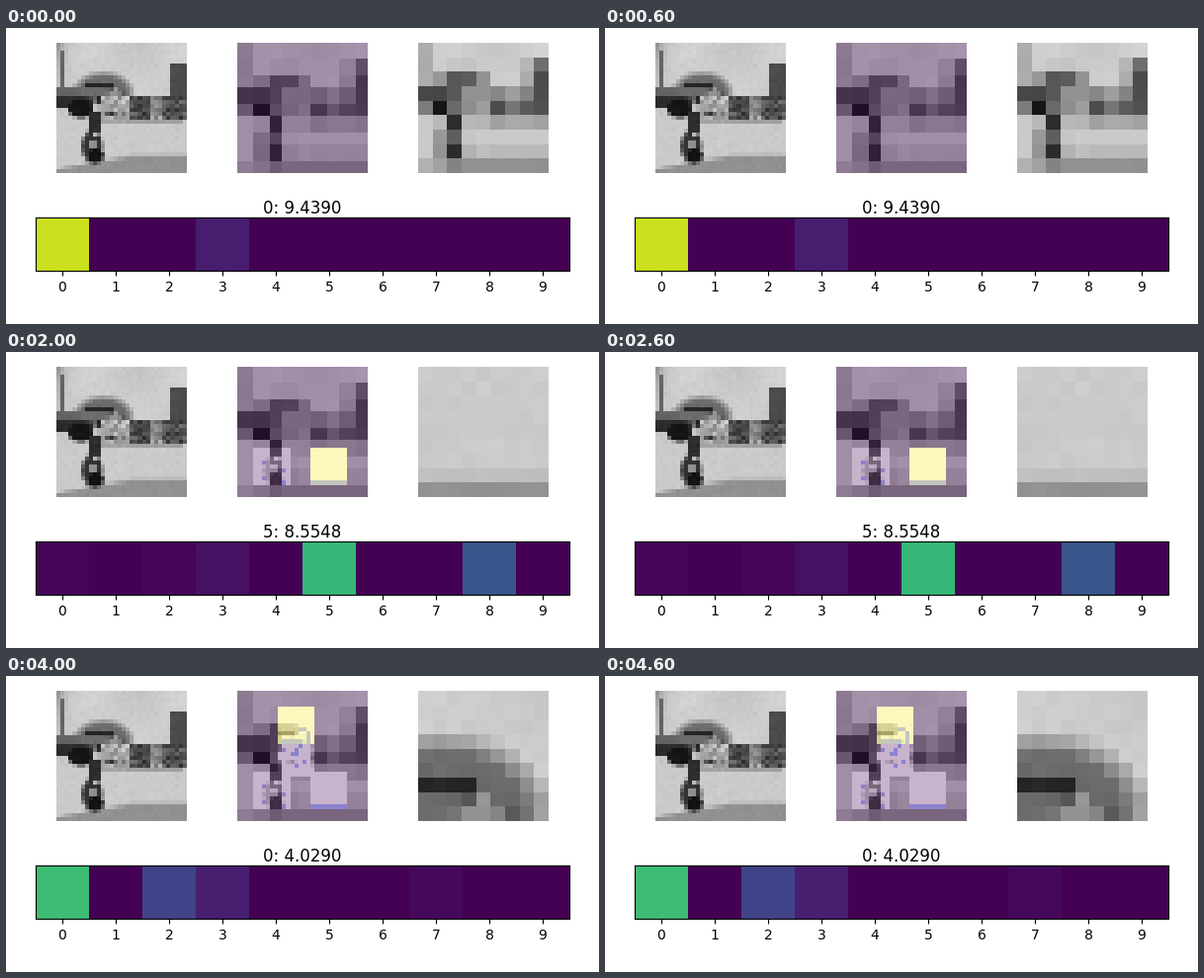
Animation, 600 px wide and 300 px high, one loop 5000 ms. Source, as a matplotlib script:

```python
import matplotlib.pyplot as plt
import numpy as np
from matplotlib.animation import FuncAnimation

SIZE, CELLS = 32, 9
PALE_BLUE = (171, 186, 255)

# Top-left corners (row, column) of the patches looked at
GLIMPSES = [(20, 4), (20, 18), (12, 10), (4, 10)]

# Main class probabilities and the score of the best class
STEPS = [
    ({0: .92, 3: .08}, 9.4390),
    ({0: .635, 2: .285, 3: .02, 4: .023, 7: .012, 8: .012}, 6.8345),
    ({0: .012, 2: .013, 3: .045, 5: .665, 8: .265}, 8.5548),
    ({0: .53, 1: .44, 2: .012, 3: .012, 7: .012}, 4.7225),
    ({0: .69, 2: .2, 3: .085, 7: .02}, 4.0290),
]

y, x = np.mgrid[:SIZE, :SIZE].astype(float)


def ellipse(cy, cx, ry, rx, soft=3):
    r = np.hypot((y - cy) / ry, (x - cx) / rx)
    return np.clip((1 - r) * soft + 0.5, 0, 1)


def box(top, bottom, left, right):
    inside = (y >= top) & (y <= bottom) & (x >= left) & (x <= right)
    return inside.astype(float)


def paint(img, mask, tone):
    img += mask * (tone - img)


def paint_ground(img):
    edge = np.maximum(27.3, 30.4 - 0.17 * x)
    paint(img, np.clip(y - edge + 0.5, 0, 1), 145)
    paint(img, box(18, 19, 9, 30), 160)


def paint_plane(img):
    paint(img, box(11, 13, 0, 9), 100)
    paint(img, ellipse(14, 3, 1.7, 6), 45)
    paint(img, ellipse(15.7, 5.5, 2.3, 3), 20)
    paint(img, ellipse(12, 11, 5, 7) * (y <= 12), 108)
    paint(img, box(10, 10, 7, 13), 38)
    paint(img, ellipse(15.5, 14.5, 3.8, 4.5), 165)
    paint(img, ellipse(13.5, 10, 1.2, 0.8), 35)
    paint(img, ellipse(17, 13, 0.8, 1.8), 80)


def paint_tail(img):
    paint(img, box(13, 18, 18, 31), 78)
    paint(img, box(13, 18, 23, 25), 130)
    paint(img, box(5, 12, 28, 31), 75)


def paint_leg(img):
    paint(img, box(17, 21, 8, 10), 45)
    paint(img, ellipse(25, 8.3, 4, 2.6), 50)
    paint(img, ellipse(24.5, 8.5, 1.4, 0.9), 145)
    paint(img, ellipse(22, 9, 0.7, 0.7), 185)
    paint(img, ellipse(27.3, 9.3, 1.7, 1.9), 20)


def make_scene():
    rng = np.random.default_rng(4)
    sky = 204 + 7 * np.sin(x / 4) * np.cos(y / 5) - 55 * np.exp(-(x + y / 3) / 2)
    img = np.where(y < 19, sky, 202)
    paint_ground(img)
    paint(img, box(2, 11, 1, 1), 100)
    for part in (paint_plane, paint_tail, paint_leg):
        part(img)
    body = np.maximum(ellipse(14.5, 14, 4, 4), box(13, 18, 18, 31))
    return np.clip(img + rng.normal(0, 1, img.shape) * (2 + 18 * body), 0, 255)


def pool(img):
    edges = -(-np.arange(CELLS + 1) * SIZE // CELLS)
    return np.array([[img[r0:r1, c0:c1].mean()
                      for c0, c1 in zip(edges, edges[1:])]
                     for r0, r1 in zip(edges, edges[1:])])


def window(corner):
    r, c = corner
    return slice(r, r + CELLS), slice(c, c + CELLS)


scene = make_scene()
coarse = pool(scene)
cell = np.arange(SIZE) * CELLS // SIZE
blurred = coarse[np.ix_(cell, cell)]


def memory(n):
    """Blurred view with the first n glimpses added to it."""
    total = blurred.copy()
    for g in GLIMPSES[:n]:
        total[window(g)] = blurred[window(g)] + scene[window(g)]
    rgb = np.repeat(np.clip(total, 0, 255)[..., None], 3, axis=2)
    rgb[(total >= 255) & (scene < 150)] = PALE_BLUE
    return rgb.astype(np.uint8)


fig = plt.figure(figsize=(6, 3), dpi=100)


def photo_axes(center, side=131.6):
    ax = fig.add_axes([(center - side / 2) / 600, 153.2 / 300,
                       side / 600, side / 300])
    ax.axis("off")
    return ax


gray = dict(cmap="gray", vmin=0, vmax=255, interpolation="nearest")
heat = dict(cmap="viridis", vmin=0, vmax=1, interpolation="nearest")

photo_axes(117).imshow(scene, **gray)
ax_mem = photo_axes(300)
mem = ax_mem.imshow(memory(0), interpolation="nearest")
focus = ax_mem.imshow(np.zeros((SIZE, SIZE)), alpha=0.3, **heat)
patch = photo_axes(483).imshow(coarse, **gray)

ax_bar = fig.add_axes([0.04999, 0.18, 0.9, 0.18])
bar = ax_bar.imshow(np.zeros((1, 10)), aspect="auto", **heat)
ax_bar.set_xticks(range(10))
ax_bar.set_yticks([])
title = ax_bar.set_title("", pad=1.8)


def update(i):
    probs, score = STEPS[i]
    row = np.zeros((1, 10))
    for k, p in probs.items():
        row[0, k] = p
    bar.set_data(row)
    title.set_text(f"{row.argmax()}: {score:.4f}")

    mask = np.zeros((SIZE, SIZE))
    view = coarse
    if i:
        here = window(GLIMPSES[i - 1])
        mask[here] = 1
        view = scene[here]
    mem.set_data(memory(i))
    focus.set_data(mask)
    patch.set_data(view)
    return mem, focus, patch, bar, title


anim = FuncAnimation(fig, update, frames=len(STEPS), interval=1000,
                     repeat=True, repeat_delay=0)
plt.show()
```
